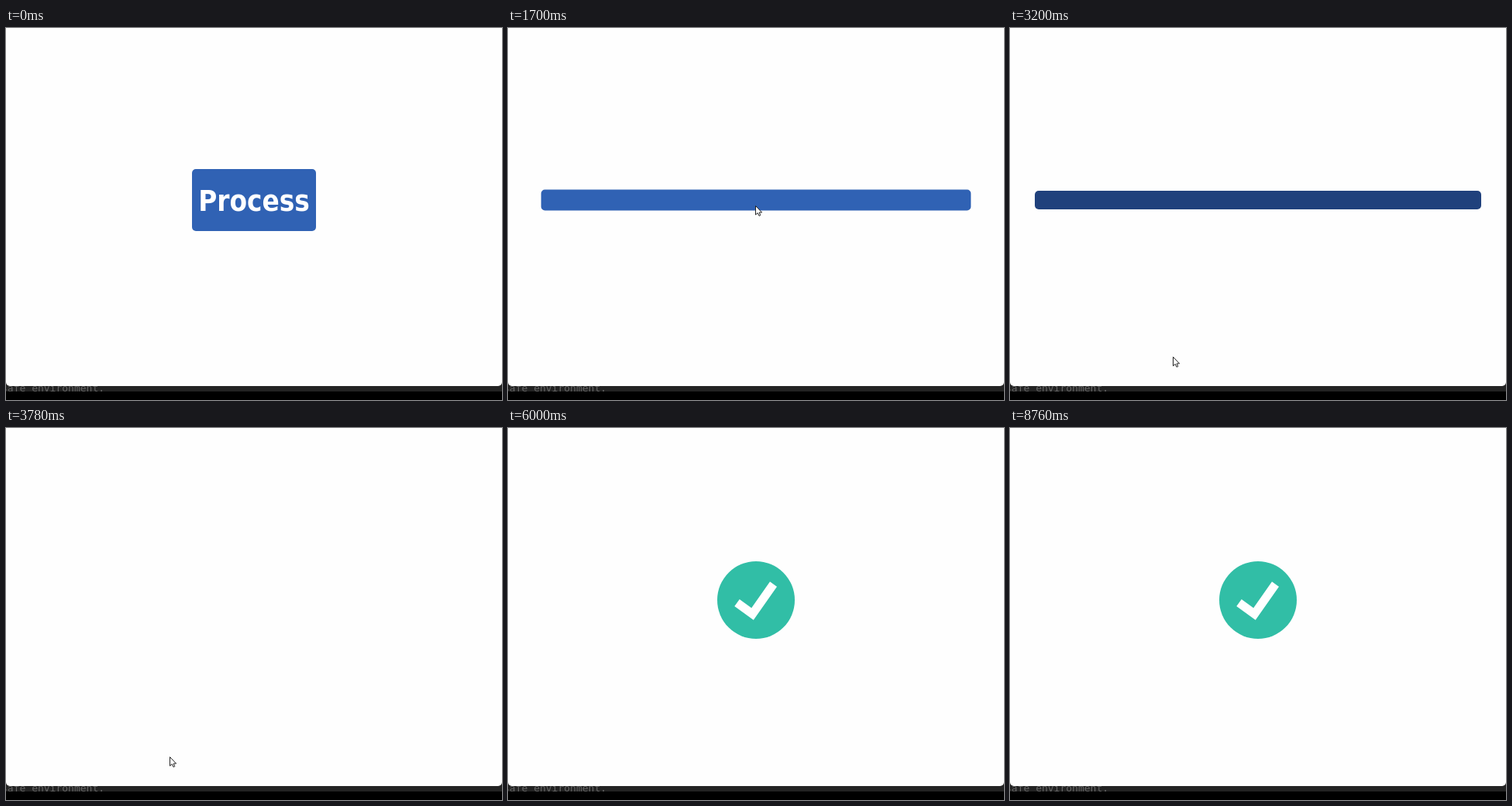
Write an HTML page that moves like this. It is 640 px wide and 480 px high and loops after 8780 ms.

```html
<!DOCTYPE html>
<html lang="en">
<head>
<meta charset="utf-8">
<title>Process button</title>
<style>
  html, body { margin: 0; width: 100%; height: 100%; overflow: hidden; background: #000; }
  svg { display: block; width: 100%; height: 100%; }
  #label {
    font: bold 36.5px "DejaVu Sans Condensed", "Noto Sans", "Open Sans", sans-serif;
    fill: #fff; text-anchor: middle;
  }
  #footer { font: 13px "DejaVu Sans Mono", monospace; fill: #666; white-space: pre; }
  #button { fill: #3062b4; }
  #progress { fill: #20417c; }
  #disc { fill: #31bea6; }
  #check { fill: none; stroke: #fff; stroke-width: 11; stroke-dasharray: 1 2; }
  #cursor { fill: #fff; stroke: #222; stroke-width: 1; }
</style>
</head>
<body>
<svg viewBox="0 0 640 480">
  <rect y="450" width="640" height="19" fill="#232323"/>
  <text id="footer" x="-6" y="469">safe environment.</text>
  <rect y="469" width="640" height="11" fill="#000"/>
  <rect y="-10" width="640" height="472" rx="5" fill="#fefefe"/>

  <rect id="button" rx="5"/>
  <text id="label" x="320" y="236">Process</text>
  <rect id="progress" rx="5"/>

  <circle id="disc" cx="320" cy="222"/>
  <path id="check" pathLength="1" d="M295.5 225.5 L315.5 240 L342.5 201.5"/>

  <path id="cursor" d="M.5 .5 V12 L3.2 9.6 L5 13.4 L6.8 12.6 L5.1 9 H8.6 Z"/>
</svg>
<script>
const LOOP = 8780;
const t0 = document.timeline.currentTime ?? 0;

// Each step: [time in ms, properties, easing towards the next step]
function play(id, steps) {
  const frames = steps.map(([ms, props, easing = 'linear']) =>
    ({ ...props, easing, offset: ms / LOOP }));
  frames.push({ ...steps[steps.length - 1][1], offset: 1 });
  const anim = document.getElementById(id)
    .animate(frames, { duration: LOOP, iterations: Infinity });
  anim.startTime = t0;
}

// A box of the given size around the stage's focal point
const box = (w, h) => ({
  x: `${320 - w / 2}px`, y: `${222 - h / 2}px`, width: `${w}px`, height: `${h}px`
});
const fromLeft = w => ({ ...box(576, 24), width: `${w}px` });
const at = (x, y) => ({ transform: `translate(${x}px, ${y}px)` });
const r = v => ({ r: `${v}px` });
const fill = c => ({ fill: c });
const show = v => ({ opacity: v });
const drawn = v => ({ strokeDashoffset: 1.02 * (1 - v) });

const BLUE = '#3062b4', DARK = '#20417c';

// Button: hover, then stretch into a bar
play('button', [
  [0, box(160, 80)], [1270, box(160, 80), 'ease'], [1870, box(576, 24)]
]);
play('button', [
  [0, fill(BLUE)], [760, fill(BLUE)], [880, fill(DARK)],
  [1270, fill(DARK)], [1450, fill(BLUE)]
]);
play('button', [[0, show(1)], [3160, show(1), 'step-end'], [3170, show(0)]]);
play('label', [[0, show(1)], [1270, show(1)], [1400, show(0)]]);

// Progress fills, then collapses to the centre
play('progress', [
  [0, fromLeft(0)], [1900, fromLeft(0)], [3160, fromLeft(576)],
  [3200, fromLeft(576), 'ease-in-out'], [3740, box(0, 24)]
]);

// Success mark
play('disc', [
  [0, r(0)], [3880, r(0), 'ease-out'], [4110, r(57), 'ease-in-out'],
  [4260, r(48.5), 'ease-in-out'], [4390, r(50)]
]);
play('check', [[0, drawn(0)], [4260, drawn(0), 'ease-in-out'], [4620, drawn(1)]]);

play('cursor', [
  [0, at(642, 332)], [220, at(642, 332), 'ease-in-out'], [920, at(319, 229)],
  [1790, at(319, 229), 'ease-in-out'], [2440, at(210, 424)],
  [3560, at(210, 424), 'step-end'], [3600, at(211, 424)],
  [4360, at(211, 424), 'ease-in'], [5280, at(201, 170)],
  [5720, at(163, -18)]
]);
</script>
</body>
</html>
```
